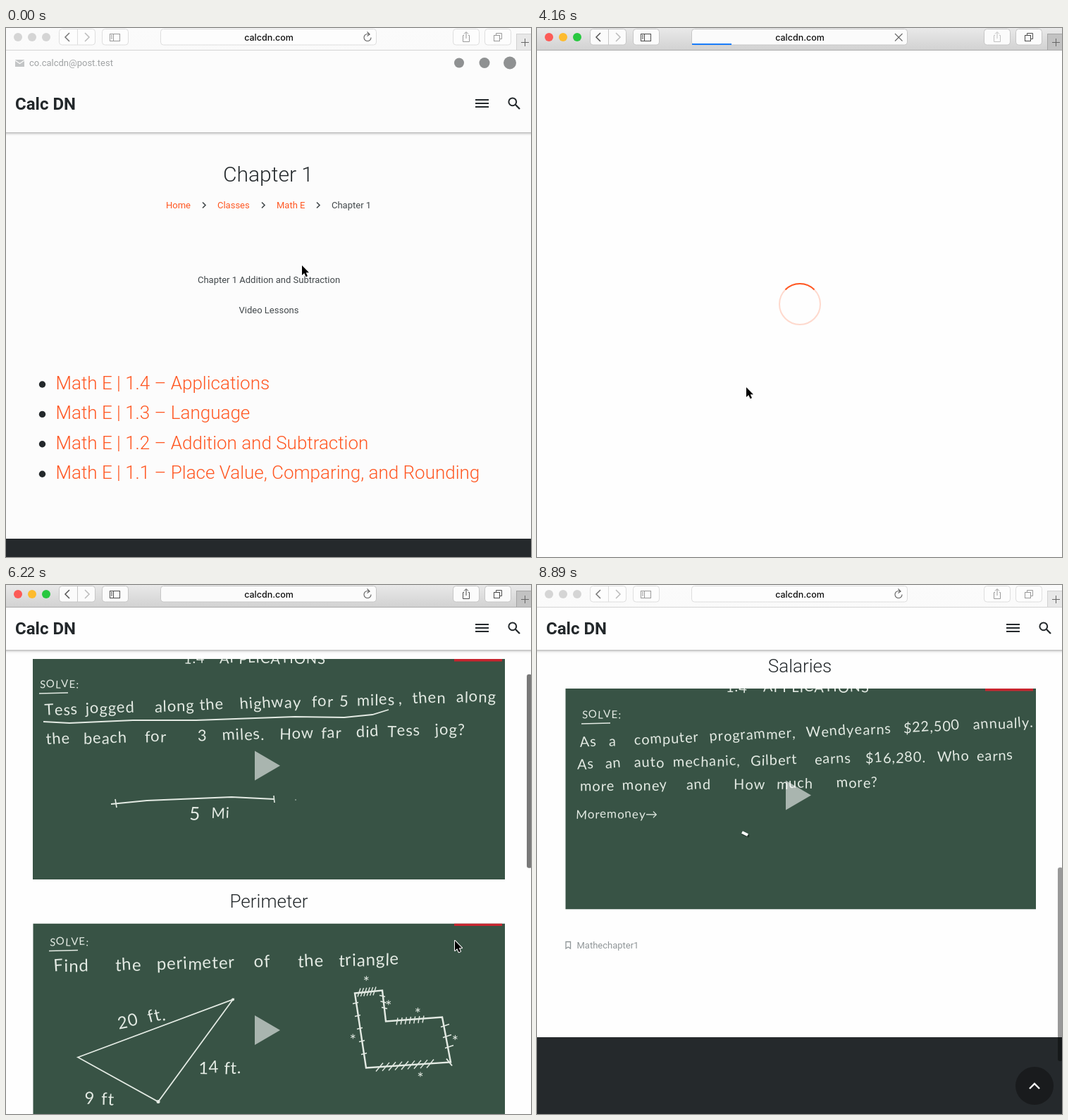
These frames come from a looping animation (745x751 px, 8.99 s). An HTML page with a canvas:

```html
<!DOCTYPE html>
<html lang="en">
<head>
<meta charset="utf-8">
<title>Lesson browsing</title>
<style>
html, body { margin: 0; width: 100%; height: 100%; overflow: hidden; background: #fefefe; }
canvas { display: block; }
</style>
</head>
<body>
<canvas id="stage" width="745" height="751"></canvas>
<script>
const ctx = document.getElementById('stage').getContext('2d');
const W = 745, H = 751, LOOP = 8990, TICK = 148.2;
const INK = '#23282b', ORANGE = '#ff5722', TEAL = '#00b6cf', GREY = '#909698', BOARD = '#385345', CHALK = '#e3eae3';
const TAU = Math.PI * 2;
const SCROLL_START = 39;
const SCROLL = [0, 70, 190, 240, 240, 390, 572, 776, 854, 884, 895, 900, 902, 902, 930, 949];

const clamp = (v, a = 0, b = 1) => Math.min(b, Math.max(a, v));
const ease = p => p * p * (3 - 2 * p);
const mix = (a, b, p) => a + (b - a) * p;
const roboto = (size, weight = 400) => `${weight} ${size}px Roboto, sans-serif`;

function text(s, x, y, font, color, align = 'left') {
  ctx.font = font;
  ctx.fillStyle = color;
  ctx.textAlign = align;
  ctx.fillText(s, x, y);
}

function rect(x, y, w, h, color) {
  ctx.fillStyle = color;
  ctx.fillRect(x, y, w, h);
}

function disc(x, y, r, color) {
  ctx.fillStyle = color;
  ctx.beginPath();
  ctx.arc(x, y, r, 0, TAU);
  ctx.fill();
}

function ring(x, y, r, color, width, from = 0, to = TAU) {
  ctx.strokeStyle = color;
  ctx.lineWidth = width;
  ctx.beginPath();
  ctx.arc(x, y, r, from, to);
  ctx.stroke();
}

function line(points, color, width, close) {
  ctx.strokeStyle = color;
  ctx.lineWidth = width;
  ctx.beginPath();
  for (let i = 0; i < points.length; i += 2) ctx.lineTo(points[i], points[i + 1]);
  if (close) ctx.closePath();
  ctx.stroke();
}

function box(x, y, w, h, r, fill, stroke) {
  ctx.beginPath();
  ctx.roundRect(x, y, w, h, r);
  ctx.fillStyle = fill;
  ctx.fill();
  if (!stroke) return;
  ctx.strokeStyle = stroke;
  ctx.lineWidth = 1;
  ctx.stroke();
}

// Chalk lettering: words are [text, x, text, x, ...] along a sloped baseline.
function chalk(size, base, slope, words) {
  for (let i = 0; i < words.length; i += 2) {
    let x = words[i + 1];
    for (const ch of words[i]) {
      const wobble = Math.sin(x * 12.9 + base);
      ctx.save();
      ctx.translate(x, base + slope * x + wobble * 0.7);
      ctx.rotate(slope + wobble * 0.05);
      text(ch, 0, 0, `${size}px Lato, "DejaVu Sans", sans-serif`, CHALK);
      x += ctx.measureText(ch).width + 0.9;
      ctx.restore();
    }
  }
}

function hatch(x1, y1, x2, y2, count, dx, dy) {
  for (let i = 0; i < count; i++) {
    const p = i / (count - 1), x = mix(x1, x2, p), y = mix(y1, y2, p);
    line([x - dx, y - dy, x + dx, y + dy], CHALK, 1.4);
  }
}

function solve(x, y) {
  chalk(15, y, 0, ['SOLVE:', x]);
  line([x - 1, y + 8, x + 40, y + 7], CHALK, 1.6);
}

function distanceBoard() {
  chalk(20, 6, 0, ['1.4', 252, 'APPLICATIONS', 303]);
  solve(48, 41);
  chalk(22, 81.7, -0.031, ['Tess', 55, 'jogged', 113, 'along', 211, 'the', 275, 'highway', 332,
    'for', 434, '5', 473, 'miles', 498, ',', 557, 'then', 577, 'along', 639]);
  line([53, 89, 90, 91, 180, 87, 270, 87, 410, 82, 480, 83, 520, 79, 543, 72], CHALK, 1.8);
  chalk(22, 123, -0.024, ['the', 57, 'beach', 110, 'for', 197, '3', 272, 'miles.', 307,
    'How', 388, 'far', 447, 'did', 497, 'Tess', 541, 'jog?', 609]);
  line([149, 206, 200, 201, 320, 196, 381, 199], CHALK, 1.8);
  line([155, 199, 157, 211], CHALK, 1.6);
  line([380, 194, 381, 204], CHALK, 1.6);
  disc(411, 200, 1, '#8fa196');
  chalk(26, 228, 0, ['5', 260]);
  chalk(21, 225, 0, ['Mi', 291]);
}

function perimeterBoard() {
  solve(62, 31);
  chalk(24, 70, -0.02, ['Find', 68, 'the', 155, 'perimeter', 214, 'of', 352, 'the', 414, 'triangle', 472]);
  line([102, 190, 322, 108, 216, 253], CHALK, 1.8, true);
  disc(322, 108, 2, CHALK);
  disc(216, 253, 2.5, CHALK);
  chalk(24, 182, -0.2, ['20', 160, 'ft.', 203]);
  chalk(24, 213, 0, ['14', 273, 'ft.', 309]);
  chalk(24, 257, 0, ['9', 112, 'ft', 135]);
  line([495, 99, 534, 95, 539, 139, 619, 133, 631, 197, 511, 205], CHALK, 2.4, true);
  hatch(501, 98, 523, 96, 6, 2, -6);
  hatch(534, 103, 537, 120, 3, 4, 1);
  hatch(555, 139, 592, 136, 7, 1, -5);
  hatch(623, 145, 629, 175, 3, 6, -2);
  hatch(530, 204, 602, 199, 9, 5, -6);
  hatch(496, 113, 508, 185, 5, 4, -1);
  line([625, 192, 633, 202], CHALK, 2);
  chalk(22, 90, 0, ['*', 506]);
  chalk(22, 125, 0, ['*', 538]);
  chalk(22, 135, 0, ['*', 579]);
  chalk(22, 174, 0, ['*', 488, '*', 632]);
  chalk(22, 227, 0, ['*', 583]);
}

function salaryBoard() {
  chalk(20, 5, 0, ['1.4', 268, 'APPLICATIONS', 321]);
  solve(64, 42);
  chalk(20, 86, -0.045, ['As', 61, 'a', 102, 'computer', 138, 'programmer,', 245, 'Wendy', 382,
    'earns', 451, '$22,500', 520, 'annually.', 619]);
  chalk(20, 115, -0.02, ['As', 57, 'an', 97, 'auto', 138, 'mechanic,', 193, 'Gilbert', 303,
    'earns', 394, '$16,280.', 466, 'Who', 568, 'earns', 624]);
  chalk(20, 146, -0.012, ['more', 61, 'money', 121, 'and', 212, 'How', 279, 'much', 340, 'more?', 425]);
  chalk(17, 184, 0, ['More', 55, 'money', 99, '→', 154]);
  line([291, 206, 301, 210], '#20332a', 3);
  line([291, 204, 299, 208], '#fff', 4);
}

const VIDEOS = [
  { title: 'Total distance', x: 38, top: 345, h: 313, board: distanceBoard },
  { title: 'Perimeter', x: 38.5, top: 720.5, h: 313.5, board: perimeterBoard },
  { title: 'Salaries', x: 40.5, top: 1096, h: 313.5, board: salaryBoard }
];

function video(v, hover) {
  text(v.title, 373, v.top - 23, roboto(26, 300), INK, 'center');
  ctx.save();
  ctx.translate(0, v.top);
  ctx.beginPath();
  ctx.rect(v.x, 0, 708 - v.x, v.h);
  ctx.clip();
  rect(0, 0, W, v.h, BOARD);
  v.board();
  rect(636, 0, 68, 3.5, '#c8252f');
  ctx.fillStyle = hover ? '#e9ebea' : 'rgba(255,255,255,.57)';
  ctx.beginPath();
  ctx.moveTo(353, 130.5);
  ctx.lineTo(389, 151.5);
  ctx.lineTo(353, 172.5);
  ctx.fill();
  ctx.restore();
}

function listPage(n) {
  rect(0, 31, W, H, '#fcfcfc');
  text('Chapter 1', 372, 218, roboto(30, 300), INK, 'center');
  const small = roboto(13), dark = '#42484b';
  text('Home', 227, 256, small, ORANGE);
  text('Classes', 300, 256, small, ORANGE);
  text('Math E', 384, 256, small, ORANGE);
  text('Chapter 1', 462, 256, small, dark);
  for (const x of [279, 363, 441]) line([x, 247.5, x + 4, 251.5, x, 255.5], dark, 1.6);
  text('Chapter 1 Addition and Subtraction', 373, 362, small, dark, 'center');
  text('Video Lessons', 373, 405, small, dark, 'center');
  const rows = ['1.4 – Applications', '1.3 – Language', '1.2 – Addition and Subtraction',
    '1.1 – Place Value, Comparing, and Rounding'];
  const p = clamp((n - 9) / 2);
  const hover = `rgb(${mix(255, 0, p)},${mix(87, 182, p)},${mix(34, 207, p)})`;
  rows.forEach((row, i) => {
    const y = 513 + i * 42.4;
    disc(51.5, y - 7, 4.7, INK);
    text('Math E | ' + row, 70.5, y, roboto(26, 300), i ? ORANGE : hover);
  });
  rect(0, 725, W, 26, '#25292c');
}

function meta() {
  const small = roboto(13);
  ring(45, 252.5, 5.7, GREY, 1.3);
  line([45, 249, 45, 253, 48, 255], GREY, 1.2);
  text('June 8, 2015', 57, 257, small, GREY);
  disc(154.5, 249.5, 2.7, GREY);
  box(149, 253.5, 11, 4.5, [4, 4, 0, 0], GREY);
  text('Calcdn', 167, 257, small, GREY);
  line([225.5, 248, 230, 248, 231.5, 249.5, 237, 249.5, 237, 257, 225.5, 257], GREY, 1.3, true);
  text('mathe, Videolessons', 244, 257, small, GREY);
}

function postPage(n, scroll) {
  rect(0, 31, W, H, '#fefefe');
  ctx.save();
  ctx.translate(0, -scroll);
  text('Math E | 1.4 – Applications', 38, 215, roboto(30, 300), INK);
  meta();
  VIDEOS.forEach((v, i) => video(v, i === 0 && n >= 37 && n < 40));
  line([41, 1455.5, 47.5, 1455.5, 47.5, 1465, 44.2, 1463, 41, 1465], GREY, 1.3, true);
  text('Mathechapter1', 56.5, 1465, roboto(13), GREY);
  rect(0, 1591, W, 400, '#25292c');
  ctx.restore();
  const drop = n < 48 ? 90 : [70, 35, 6][n - 48] || 0;
  disc(706, 711 + drop, 27, '#191b1d');
  line([699, 715 + drop, 706, 708 + drop, 713, 715 + drop], '#fff', 2.4);
}

function header(bg, scroll) {
  const p = clamp(scroll / 120), up = 46 * p, bottom = 148 - 56 * p;
  ctx.save();
  ctx.shadowColor = 'rgba(0,0,0,.4)';
  ctx.shadowBlur = 4;
  ctx.shadowOffsetY = 1;
  rect(-10, 20, W + 20, bottom - 20, bg);
  ctx.restore();
  rect(13, 45 - up, 13, 10, '#c3c5c6');
  line([13, 46 - up, 19.5, 50.5 - up, 26, 46 - up], bg, 1.2);
  text('co.calcdn@post.test', 33, 54 - up, roboto(13), '#a0a3a4');
  disc(643, 49.5 - up, 7, '#8f9192');
  disc(679, 49.5 - up, 7.5, '#8f9192');
  disc(715, 49.5 - up, 9, '#8f9192');
  text('Calc DN', 13, 115.5 - up, roboto(24, 700), INK);
  for (const y of [101, 106, 111]) rect(666, y - up, 19, 2, INK);
  ring(718.8, 104.8 - up, 5.4, INK, 2);
  line([722.8, 108.8 - up, 729, 115 - up], INK, 2.3);
}

function toolbar(n, scroll) {
  const active = n >= 4 && n < 60, loading = n >= 14 && n < 34;
  const edge = active ? '#c6c6c6' : '#dedede';
  const dark = active ? '#4c4c4c' : '#9a9a9a';
  const shade = ctx.createLinearGradient(0, 0, 0, 31);
  shade.addColorStop(0, active ? '#e9e9e9' : '#fbfbfb');
  shade.addColorStop(1, active ? '#d2d2d2' : '#fafafa');
  rect(0, 0, W, 31, shade);
  const covered = VIDEOS.some(v => scroll + 15 > v.top && scroll + 15 < v.top + v.h);
  if (active && covered) {
    const tint = ctx.createLinearGradient(0, 0, W, 0);
    [0.09, 0.23, 0.23, 0.1].forEach((a, i) => tint.addColorStop([0, 0.1, 0.9, 1][i], `rgba(56,83,69,${a})`));
    rect(0, 0, W, 31, tint);
  }
  rect(0, 31, W, 1, active ? '#acacac' : '#d4d4d4');
  ['#fc5b57', '#fdbb2e', '#28c840'].forEach((c, i) => disc(17 + i * 20, 13, 6, active ? c : '#d5d5d5'));
  for (const [x, w] of [[75.5, 51], [136.5, 37], [219.5, 306], [634.5, 37], [679.5, 37]])
    box(x, 1.5, w, 22.5, 4, active ? '#fbfbfb' : '#fdfdfd', edge);
  rect(101, 2, 1, 22, edge);
  line([90, 7, 84, 13, 90, 19], active ? '#555' : '#777', 1.5);
  line([112, 7, 118, 13, 112, 19], '#bcbcbc', 1.5);

  ctx.strokeStyle = dark;
  ctx.lineWidth = 1;
  ctx.strokeRect(147.5, 8.5, 14, 10);
  line([152.5, 8, 152.5, 19], dark, 1);
  for (const y of [10.5, 12.5, 14.5]) line([149, y, 151, y], dark, 1);

  text('calcdn.com', 373, 18, '500 12.5px Inter, sans-serif', '#111', 'center');
  if (loading) {
    const w = n < 28 ? 56 * (1 - (1 - clamp((n - 13) / 7)) ** 2) : 56 + 50 * (n - 28);
    rect(220, 22, Math.min(305, w), 2, '#1a7dfa');
    line([508, 8, 518.5, 18.5], '#666', 1.1);
    line([508, 18.5, 518.5, 8], '#666', 1.1);
  } else {
    ring(513, 13.5, 5, '#5f5f5f', 1.1, 0, TAU * 0.86);
    line([512.5, 5.5, 516, 9, 512.5, 11.5], '#5f5f5f', 1.1);
  }

  const share = loading ? '#c2c2c2' : dark;
  line([650, 10.5, 648.5, 10.5, 648.5, 19.5, 657.5, 19.5, 657.5, 10.5, 656, 10.5], share, 1);
  line([653, 15, 653, 6], share, 1);
  line([650, 8.5, 653, 5.5, 656, 8.5], share, 1);
  line([695.5, 10, 695.5, 7.5, 703.5, 7.5, 703.5, 15.5, 701, 15.5], dark, 1);
  ctx.strokeRect(692.5, 10.5, 8, 8);

  rect(724, 8, 21, 23, active ? '#a5a5a5' : '#d2d2d2');
  rect(725, 9, 20, 22, active ? '#c2c2c2' : '#e8e8e8');
  rect(731, 20, 11, 1, '#666');
  rect(736, 15, 1, 11, '#666');
}

const ARROW = new Path2D('M0 0V14L3.2 11L5.6 16.3L8 15.2L5.7 10.2H10Z');
const HAND = new Path2D('M-2 1Q-.5-1 1 1L2 6Q4 4.5 5 6.3Q7 5.3 8 7Q10 6.5 10 9L9 13L8 16H1Q-1 13-4 10Q-5 8-3 8L-1 9.5Z');

function cursor(n) {
  if (n >= 57) return;
  const hand = (n >= 10 && n < 16) || (n >= 37 && n < 40);
  let x, y;
  if (n < 28) {
    const p = ease(clamp((n - 1) / 8));
    x = mix(420, 297, p);
    y = mix(337, 510, p);
  } else if (n < 56) {
    const p = ease(clamp((n - 29) / 7));
    x = mix(297, 637, p);
    y = mix(510, n < 40 ? 507 : 505, p);
  } else {
    x = 712;
    y = 727;
  }
  ctx.save();
  ctx.translate(x, y);
  ctx.lineJoin = 'round';
  if (hand) {
    ctx.fillStyle = '#fff';
    ctx.fill(HAND);
    ctx.lineWidth = 1.3;
    ctx.strokeStyle = '#111';
    ctx.stroke(HAND);
    for (const k of [2.5, 4.5, 6.5]) line([k, 10, k, 14], '#111', 0.9);
  } else {
    ctx.lineWidth = 2;
    ctx.strokeStyle = '#fff';
    ctx.stroke(ARROW);
    ctx.fillStyle = '#000';
    ctx.fill(ARROW);
  }
  ctx.restore();
}

function spinner(n) {
  const turn = (n - 28) * TICK / 800 * TAU;
  ring(373, 392, 29, 'rgba(255,87,34,.22)', 2);
  ring(373, 392, 29, ORANGE, 2, turn - TAU * 3 / 8, turn - TAU / 8);
}

function draw(n) {
  const scroll = n < SCROLL_START ? 0 : SCROLL[Math.min(n - SCROLL_START, SCROLL.length - 1)];
  ctx.clearRect(0, 0, W, H);
  if (n < 28) {
    listPage(n);
    header('#fcfcfc', 0);
  } else if (n < 33) {
    rect(0, 31, W, H, '#fefefe');
    spinner(n);
  } else {
    postPage(n, scroll);
    header('#fefefe', scroll);
    rect(0, 31, W, H, `rgba(254,254,254,${1 - clamp((n - 32) / 5)})`);
    if (n >= SCROLL_START)
      box(739, 34 + scroll * 0.3866, 7, 275, 3, n < 60 ? 'rgba(0,0,0,.52)' : 'rgba(0,0,0,.4)');
  }
  toolbar(n, scroll);
  cursor(n);
}

let shown = -1;
function frame() {
  const n = Math.min(60, Math.floor((performance.now() % LOOP + 4) / TICK));
  if (n !== shown) draw(shown = n);
  requestAnimationFrame(frame);
}
frame();
</script>
</body>
</html>
```
